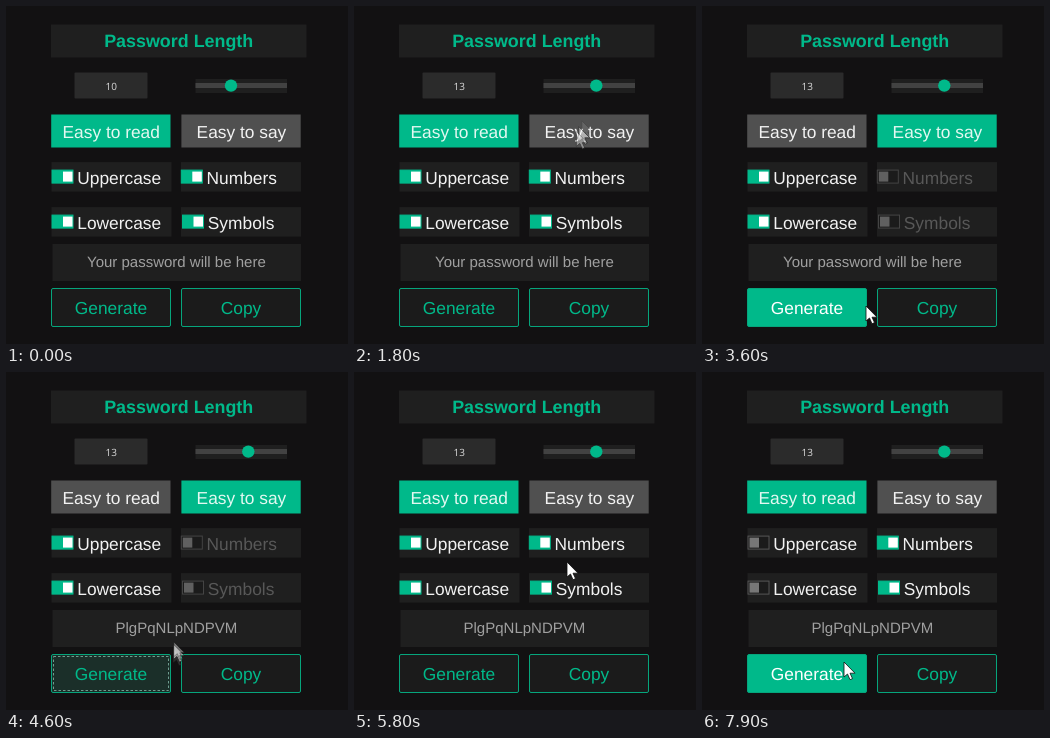
An HTML page for the animation above (8 s loop, 342 px wide and 338 px high).

```html
<!DOCTYPE html>
<html lang="en">
<head>
<meta charset="utf-8">
<title>Password generator</title>
<style>
  html, body { margin: 0; width: 100%; height: 100%; overflow: hidden; background: #121112; }
  svg { display: block; width: 342px; height: 338px; }
  text { font: 17.35px "Liberation Sans", Arial, sans-serif; fill: #f2f2f2; text-rendering: geometricPrecision; }
  .mid { text-anchor: middle; }
  .title { font-weight: bold; font-size: 17.9px; fill: #00b98a; }
  .field { font-size: 15px; fill: #a0a0a0; }
  .number { font: 10px "Open Sans", sans-serif; fill: #ddd; }
</style>
</head>
<body>
<svg id="stage" viewBox="0 0 342 338"></svg>
<script>
const GREEN = '#00b98a', GREY = '#505050', PANEL = '#1f1f1f';
const LOOP = 8000, STEP = 100, TRAVEL = 340;
const CLICK = { say: 2200, generate: 3800, read: 5200, lower: 6400, upper: 7200 };
const stage = document.getElementById('stage');

function set(node, attrs) {
  for (const key in attrs) node.setAttribute(key, attrs[key]);
}
function add(tag, attrs) {
  const node = document.createElementNS('http://www.w3.org/2000/svg', tag);
  set(node, attrs);
  return stage.appendChild(node);
}
function rect(x, y, width, height, fill, extra = {}) {
  return add('rect', { x, y, width, height, fill, ...extra });
}
function label(x, y, content, cls = '') {
  const node = add('text', { x, y, class: cls });
  node.textContent = content;
  return node;
}

rect(45, 18.5, 255.5, 33, PANEL);
label(172.7, 41, 'Password Length', 'mid title');
rect(68.5, 66.5, 73, 26, '#2b2b2b', { rx: 1 });
const count = label(105.2, 83.5, '10', 'mid number');
rect(189.5, 73, 91.5, 14, PANEL);
rect(189.5, 77, 91.5, 5, '#424242');
const knob = add('circle', { cy: 79.6, r: 6.2, fill: GREEN });

function modeButton(x, content) {
  const box = rect(x, 108.5, 119.3, 33, GREY);
  const caption = label(x + 60, 131.8, content, 'mid');
  return active => {
    set(box, { fill: active ? GREEN : GREY });
    caption.style.fill = active ? '#e2f8f1' : '#f2f2f2';
  };
}
const readMode = modeButton(45.2, 'Easy to read');
const sayMode = modeButton(175.4, 'Easy to say');

function toggle(x, y, panelX, content) {
  rect(panelX, y - 7.5, 120, 29.5, PANEL);
  const track = rect(x + .5, y + .5, 21, 13, GREEN);
  const thumb = rect(x, y + 2, 9.5, 10, '#fff');
  const caption = label(x + 25.8, y + 14.3, content);
  return (on, enabled = true) => {
    set(track, { fill: on ? GREEN : '#1b1b1b', stroke: on ? GREEN : enabled ? '#555' : '#444' });
    set(thumb, { x: x + (on ? 11.5 : 2), fill: on ? '#fff' : enabled ? '#777' : '#606060' });
    caption.style.fill = enabled ? '#f2f2f2' : '#585858';
  };
}
const uppercase = toggle(45.5, 163.6, 45.5, 'Uppercase');
const numbers = toggle(174.8, 163.6, 175, 'Numbers');
const lowercase = toggle(45.5, 208.6, 45.5, 'Lowercase');
const symbols = toggle(176, 208.6, 175, 'Symbols');

rect(46.5, 238, 248.5, 37, PANEL);
const password = label(170.4, 261, '', 'mid field');

function outlineButton(x, content) {
  const box = rect(x, 282.5, 119, 38, PANEL, { stroke: '#06a57c', rx: 1.5 });
  const focus = rect(x + 2, 284.5, 115, 34, 'none', { stroke: '#6f9c8f', 'stroke-dasharray': '2.5 2' });
  const caption = label(x + 59.5, 307.8, content, 'mid');
  return (hover, focused) => {
    set(box, { fill: hover ? GREEN : focused ? '#1b2f29' : '#1b1b1b' });
    set(focus, { visibility: focused ? 'visible' : 'hidden' });
    caption.style.fill = hover ? '#fff' : GREEN;
  };
}
const generate = outlineButton(45.5, 'Generate');
const copy = outlineButton(175.5, 'Copy');
copy(false, false);

const ARROW = 'M0 0V15L3.5 12L6 17.7L8.5 16.6L6 11.2H11Z';
const HAND = 'M-2 1Q0-1 2 1V7Q8 6 11 10V15L8.5 20H0L-5.5 12.5Q-5 9.5-2 11.5Z';
const pointers = [-33, 0, 33].map(shift => ({
  shift,
  node: add('path', { fill: '#fff', stroke: '#111', 'stroke-width': .8, 'stroke-linejoin': 'round' })
}));

// Each stop is reached at time `at`; the pointer rests there until the next move.
const stops = [
  { at: 0, x: 225, y: 85 },
  { at: 900, x: 243, y: 85 },
  { at: 1900, x: 220, y: 130 },
  { at: 3070, x: 164, y: 300 },
  { at: 4680, x: 168, y: 268 },
  { at: 5080, x: 114, y: 130 },
  { at: 5740, x: 213, y: 190 },
  { at: 6300, x: 58, y: 214 },
  { at: 6740, x: 109, y: 186 },
  { at: 7200, x: 58, y: 171 },
  { at: 7750, x: 142, y: 290 }
];
function ease(k) {
  const c = Math.max(0, Math.min(1, k));
  return c * c * (3 - 2 * c);
}
function pointerAt(t) {
  return stops.reduce((from, to) => {
    const k = ease((t - to.at + TRAVEL) / TRAVEL);
    return { x: from.x + (to.x - from.x) * k, y: from.y + (to.y - from.y) * k };
  });
}

// A fast pointer leaves a faint copy before and after itself.
function drawPointer(t) {
  const [before, , after] = pointers.map(({ shift }) => pointerAt(t + shift));
  const moving = Math.hypot(after.x - before.x, after.y - before.y) > 3;
  for (const { shift, node } of pointers) {
    const { x, y } = pointerAt(t + shift);
    const strength = moving ? .55 - Math.abs(shift) / 110 + shift / 250 : shift ? 0 : 1;
    set(node, {
      d: t < 1600 ? HAND : ARROW,
      transform: `translate(${x} ${y})`,
      opacity: t < 400 ? 0 : strength
    });
  }
}

function render(t) {
  const tip = pointerAt(t);
  const slide = Math.min(1, (pointerAt(Math.min(t, 1500)).x - 225) / 18);
  set(knob, { cx: 225 + 17.3 * slide });
  count.textContent = 10 + Math.round(3 * slide);

  const saying = t >= CLICK.say && t < CLICK.read;
  readMode(!saying);
  sayMode(saying);
  uppercase(t < CLICK.upper);
  lowercase(t < CLICK.lower);
  numbers(!saying, !saying);
  symbols(!saying, !saying);

  const generated = t >= CLICK.generate;
  password.textContent = generated ? 'PlgPqNLpNDPVM' : 'Your password will be here';
  generate(tip.x < 165 && tip.y > 282, generated && t < CLICK.read);
  drawPointer(t);
}

function frame(now) {
  const t = now % LOOP;
  render(t - t % STEP);
  requestAnimationFrame(frame);
}
requestAnimationFrame(frame);
</script>
</body>
</html>
```
